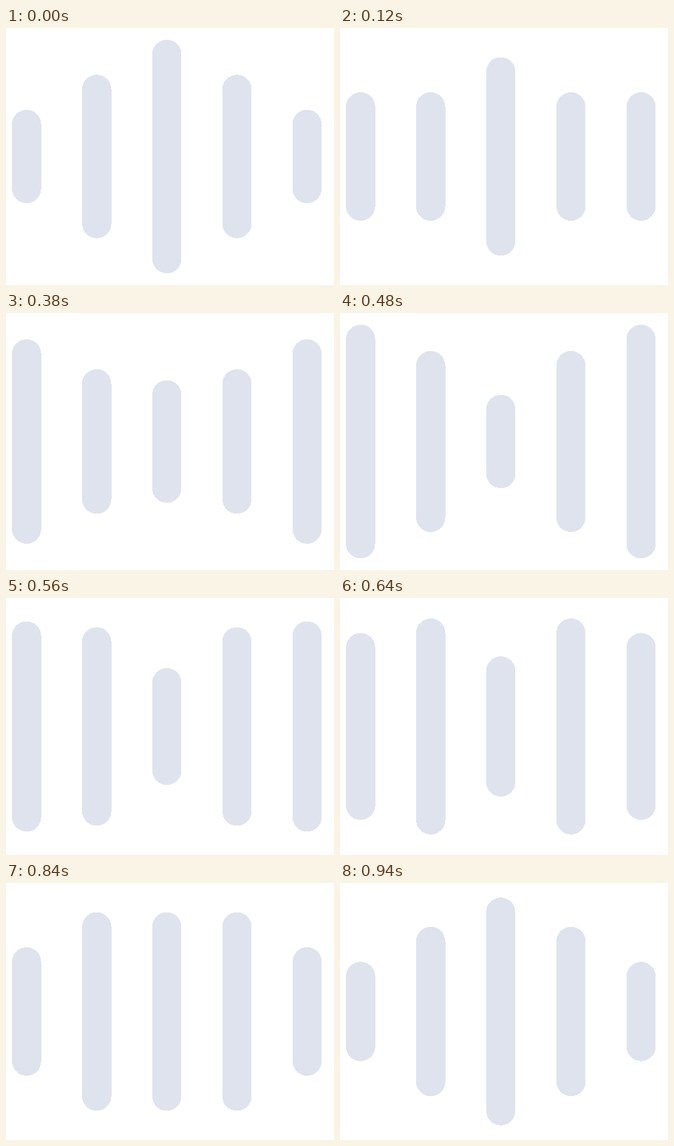
An HTML page for the animation above (960 ms loop, 500x392 px).

```html
<!DOCTYPE html>
<html lang="en">
<head>
<meta charset="utf-8">
<title>Sound bars</title>
<style>
  html, body { margin: 0; width: 100%; height: 100%; overflow: hidden; background: #fff; }
  svg { display: block; width: 500px; height: 392px; fill: #dfe3ee; shape-rendering: crispEdges; }
</style>
</head>
<body>
<svg viewBox="0 0 500 392"></svg>
<script>
const LOOP = 960, STEP = 20;
const WIDTH = 44.55, PITCH = 106.9, LEFT = 9.1, MIDDLE = 196, FULL = 356.4;

// Relative heights at each quarter of the loop
const outer = [0.4, 0.7, 1, 0.7];
const inner = [0.7, 0.4, 0.775, 1];
const centre = [1, 0.7, 0.4, 0.7];

const svg = document.querySelector('svg');
const bars = [outer, inner, centre, inner, outer].map((heights, i) => {
  const rect = document.createElementNS(svg.namespaceURI, 'rect');
  rect.setAttribute('x', LEFT + PITCH * i);
  rect.setAttribute('width', WIDTH);
  rect.setAttribute('rx', WIDTH / 2);
  svg.append(rect);
  return { rect, heights };
});

function draw(now) {
  const time = Math.floor((now % LOOP) / STEP) * STEP;
  const phase = time / LOOP * 4;
  const quarter = Math.floor(phase);
  for (const { rect, heights } of bars) {
    const from = heights[quarter], to = heights[(quarter + 1) % 4];
    const height = FULL * (from + (to - from) * (phase - quarter));
    rect.setAttribute('y', MIDDLE - height / 2);
    rect.setAttribute('height', height);
  }
}

let start;
function tick(now) {
  start ??= now;
  draw(now - start);
  requestAnimationFrame(tick);
}
draw(0);
requestAnimationFrame(tick);
</script>
</body>
</html>
```
